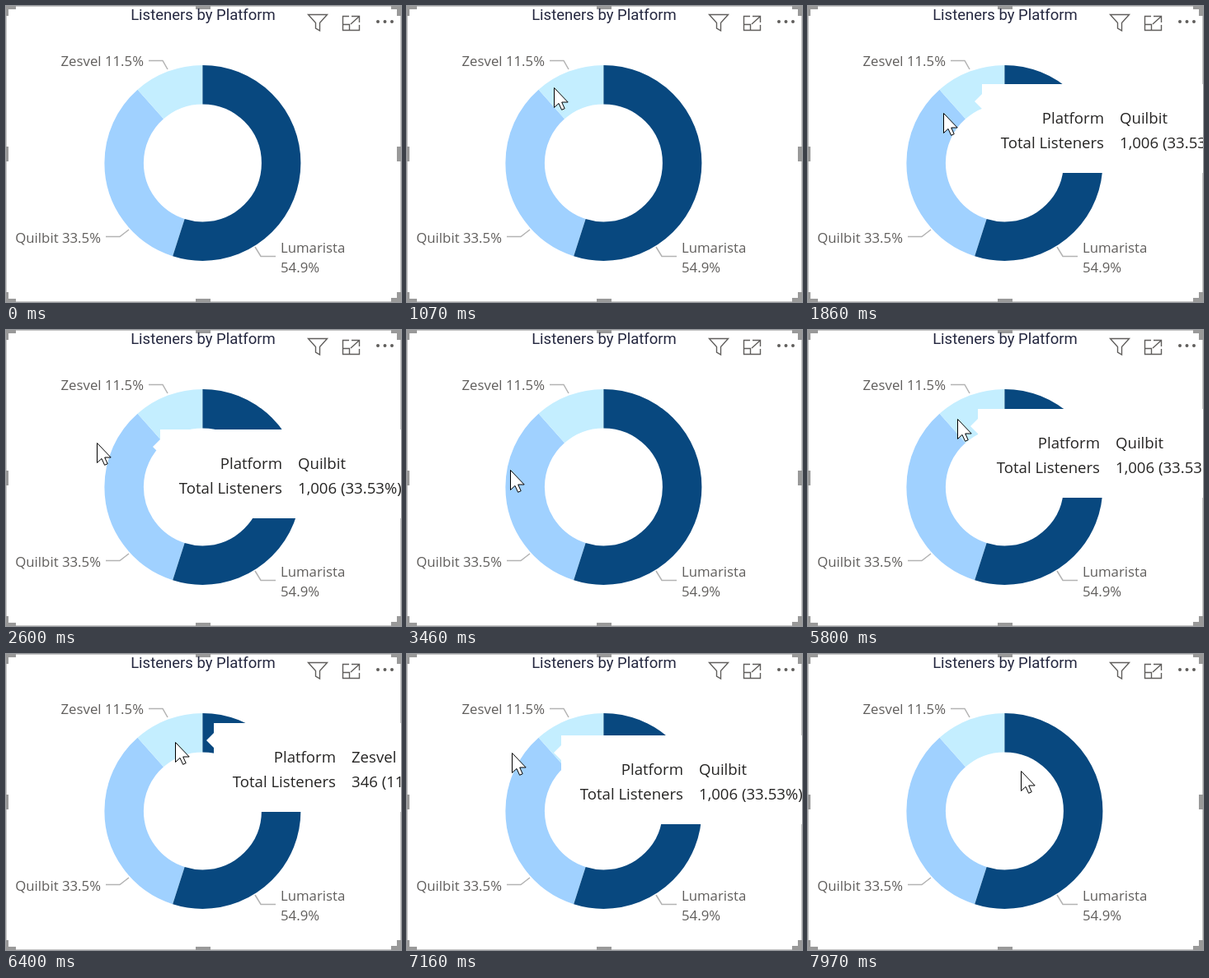
Animation, 479 px wide and 360 px high, one loop 8000 ms. Source, as an HTML page:

```html
<!DOCTYPE html>
<html lang="en">
<head>
<meta charset="utf-8">
<title>Listeners by Platform</title>
<style>
  html, body { margin: 0; width: 100%; height: 100%; overflow: hidden; background: #fff; }
  svg { display: block; width: 100vw; height: 100vh; }
  text { font-family: "Open Sans", "Noto Sans", sans-serif; }
  .title { font: 400 18.5px Roboto, sans-serif; fill: #252840; text-anchor: middle; }
  .label { font-size: 16.8px; fill: #605e5c; }
  .tip text { font-size: 18.6px; fill: #252423; }
  .end { text-anchor: end; }
  .ring circle { fill: none; stroke-width: 47.5; }
  .leader { fill: none; stroke: #b3b3b3; stroke-width: 1.5; }
  .icon { fill: none; stroke: #605e5c; stroke-width: 1.4; }
  .dots { fill: none; stroke: #605e5c; stroke-width: 4; stroke-linecap: round; stroke-dasharray: 0 8.5; }
  .handles { fill: #999; }
</style>
</head>
<body>
<svg viewBox="0 0 479 360">
  <rect x=".5" y=".5" width="478" height="359" fill="#fff" stroke="#c8c8c8"/>
  <g class="handles">
    <path d="M0 0H12V4H3V12H0ZM467 0H479V12H474V4H467ZM0 360V348H3V356H12V360ZM479 360H467V355H474V348H479Z"/>
    <path d="M230 0h18v4h-18zM230 356h18v4h-18zM0 171h3v18h-3zM474 171h5v18h-5z"/>
  </g>

  <text class="title" x="239" y="17">Listeners by Platform</text>

  <path class="icon" d="M366.5 10.5H389.5L380.5 20.5V30L375.5 27V20.5Z"/>
  <path class="icon" d="M416 12.5H408.5V29.5H428.5V23M419 12.5H428.5V20M428 13L418 22M408.5 22.5H416.5V29.5"/>
  <path class="dots" d="M451 19H469"/>

  <g class="ring" transform="translate(238.4 190.9) rotate(-90)">
    <circle r="95.25" pathLength="100" stroke="#a0d1ff" stroke-dasharray="33.53 66.47" stroke-dashoffset="-54.94"/>
    <circle r="95.25" pathLength="100" stroke="#c4eeff" stroke-dasharray="11.53 88.47" stroke-dashoffset="-88.47"/>
    <circle r="95.25" pathLength="100" stroke="#08487f" stroke-dasharray="54.94 45.06"/>
  </g>

  <path class="leader" d="M173 66.5H190L196 77M121 280.5H138L149 272M302 293L309 304.5H327"/>
  <text class="label end" x="167" y="73">Zesvel 11.5%</text>
  <text class="label end" x="115" y="288">Quilbit 33.5%</text>
  <text class="label" x="333" y="300">Lumarista</text>
  <text class="label" x="333" y="324">54.9%</text>

  <g class="tip" id="tip" visibility="hidden">
    <path d="M0 0H310V108H0V30L-9 21L0 12Z" fill="#fff"/>
    <text class="end" x="148" y="48">Platform</text>
    <text class="end" x="148" y="78">Total Listeners</text>
    <text id="name" x="167" y="48"></text>
    <text id="count" x="167" y="78"></text>
  </g>

  <path id="cursor" visibility="hidden" d="M.5 .5V24.5L6 19.4L9.6 27.3L13.2 25.7L9.7 18H17.2Z" fill="#fff" stroke="#000"/>
</svg>
<script>
  const LOOP = 8000, TICK = 1000 / 15;
  const CENTER = { x: 238.5, y: 191 };
  const $ = id => document.getElementById(id);
  const tip = $("tip"), cursor = $("cursor");

  // Each move runs from the last resting point to `to`, curving towards `bend`.
  const moves = [
    { start: 260, end: 467, to: [167, 89] },
    { start: 800, end: 1130, to: [181, 101] },
    { start: 1600, end: 1933, to: [158, 147], bend: [174, 98] },
    { start: 2200, end: 2400, to: [110, 137], bend: [140, 139] },
    { start: 3200, end: 3930, to: [134, 182], bend: [136, 196] },
    { start: 4740, end: 4866, to: [127, 179] },
    { start: 5467, end: 5930, to: [221, 95], bend: [140, 110] },
    { start: 6070, end: 6866, to: [145, 120], bend: [215, 111] },
    { start: 6900, end: 7133, to: [127, 120] },
    { start: 7200, end: 7930, to: [258, 142], bend: [96, 150] }
  ];

  // The tooltip trails the pointer until `follow`, then stays and fades.
  const visits = [
    { start: 1730, follow: 2266, fade: 2600, end: 2900 },
    { start: 4330, follow: 6866, fade: 7350, end: 7600 }
  ];

  function pointerAt(t) {
    let from = [140, 40];
    for (const { start, end, to, bend } of moves) {
      if (t < start) break;
      const k = Math.min(1, (t - start) / (end - start));
      from = from.map((a, i) => {
        const b = bend ? bend[i] : (a + to[i]) / 2;
        return (1 - k) ** 2 * a + 2 * k * (1 - k) * b + k * k * to[i];
      });
    }
    return from.map(Math.round);
  }

  const place = (el, x, y) => el.setAttribute("transform", `translate(${x} ${y})`);
  const show = (el, on) => el.setAttribute("visibility", on ? "visible" : "hidden");

  function drawTip(t) {
    const visit = visits.find(v => t >= v.start && t < v.end);
    show(tip, visit);
    if (!visit) return;
    const [x, y] = pointerAt(Math.min(t - TICK, visit.follow));
    const turn = Math.atan2(CENTER.x - x, CENTER.y - y) / (2 * Math.PI);
    const smallSlice = turn < 0.1153;
    $("name").textContent = smallSlice ? "Zesvel" : "Quilbit";
    $("count").textContent = smallSlice ? "346 (11.53%)" : "1,006 (33.53%)";
    tip.setAttribute("opacity", Math.min(1, (visit.end - t) / (visit.end - visit.fade)));
    place(tip, x + 42, y - 21);
  }

  function draw(time) {
    const t = Math.floor((time % LOOP) / TICK + 0.15) * TICK;
    show(cursor, t >= moves[0].start);
    place(cursor, ...pointerAt(t));
    drawTip(t);
  }

  let begin;
  function frame(now) {
    begin ??= now;
    draw(now - begin);
    requestAnimationFrame(frame);
  }
  requestAnimationFrame(frame);
</script>
</body>
</html>
```
